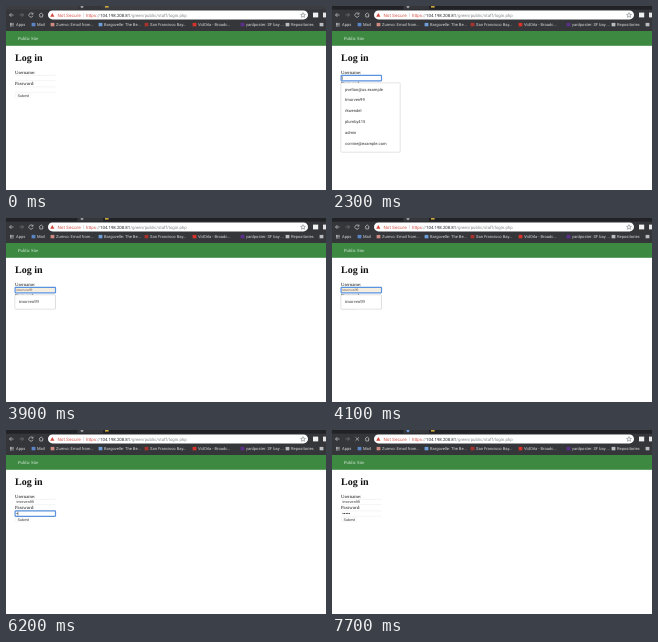
Recreate the animation shown at these times as an HTML page. Size 320x184 px, loop 8 s.

```html
<!DOCTYPE html>
<html lang="en">
<head>
<meta charset="utf-8">
<title>Log in</title>
<style>
  html, body { margin: 0; width: 100%; height: 100%; overflow: hidden; background: #fff; }
  svg { display: block; width: 100%; height: 100%; }
  text { text-rendering: geometricPrecision; white-space: pre; }
  .ui { font: 4.1px Roboto, sans-serif; }
  .form { font: 3.7px "Liberation Sans", sans-serif; fill: #333; }
  .serif { font-family: "Liberation Serif", serif; }
  .field { fill: none; stroke: #e4e4e4; stroke-width: .4; }
  .ring { fill: none; stroke: #5a92de; stroke-width: 1.2; }
  .caret { stroke: #333; stroke-width: .5; }
  .menu { fill: #fff; stroke: #d2d2d2; stroke-width: .4; filter: drop-shadow(0 .5px .6px #0004); }
  .icon { fill: none; stroke: #c6c8cb; stroke-width: .7; }
</style>
</head>
<body>
<svg id="stage" viewBox="0 0 320 184">
  <rect width="320" height="184" fill="#fff"/>

  <!-- browser chrome -->
  <rect width="320" height="25" fill="#35363a"/>
  <rect id="strip" width="320" height="3.6"/>
  <path d="M70 3.6Q71.5 3.6 71.5 2V0H97V2Q97 3.6 98.5 3.6Z" fill="#35363a"/>
  <circle id="spinner" cx="76" cy=".8" r="1.4"/>
  <rect x="99" width="3.6" height="1.6" fill="#cfa93c"/>
  <g class="icon">
    <path d="M7.5 9H3.5M5.4 7.1L3.5 9L5.4 10.9"/>
    <path d="M13.5 9H17.5M15.6 7.1L17.5 9L15.6 10.9" stroke="#77797d"/>
    <path id="reload" d="M26.7 7.8A2.1 2.1 0 1 0 27 9.7M27 6.6V8.2H25.4"/>
    <path id="stop" d="M23.6 7.3L27 10.7M27 7.3L23.6 10.7"/>
    <path d="M32.9 9L35.2 6.9L37.5 9M33.8 8.6V11H36.6V8.6"/>
  </g>
  <rect x="42" y="4.4" width="260" height="9" rx="4.5" fill="#fff"/>
  <path d="M46.3 7.1L48.4 10.7H44.2Z" fill="#d2483d"/>
  <text x="51.5" y="10.6" fill="#d2483d" style="font:4.4px Inter,sans-serif">Not Secure</text>
  <path d="M77.5 7V11" stroke="#c4c4c4" stroke-width=".5"/>
  <text class="ui" x="80" y="10.6" fill="#85878b" style="font-size:4.33px"><tspan fill="#d2483d">https</tspan>://<tspan fill="#2b2c30">104.198.208.81</tspan>/green/public/staff/login.php</text>
  <path d="M297 6.7L297.7 8.3L299.4 8.5L298.1 9.6L298.5 11.3L297 10.4L295.5 11.3L295.9 9.6L294.6 8.5L296.3 8.3Z" fill="none" stroke="#5f6368" stroke-width=".5"/>
  <rect x="307" y="6.6" width="5.2" height="4.8" fill="#f0f0f0"/>
  <rect x="317" y="6.6" width="3" height="4.8" fill="#e4e4e4"/>
  <g id="bookmarks" class="ui" fill="#d6d7da"></g>

  <!-- page -->
  <rect y="25" width="320" height="14.8" fill="#3d8942"/>
  <text class="serif" x="12" y="33.9" font-size="4.65" fill="#dcebdc">Public Site</text>
  <g class="serif" fill="#111" font-size="4.7">
    <text x="9" y="54.7" font-size="10" font-weight="bold">Log in</text>
    <text x="9" y="67.9">Username:</text>
    <text x="9" y="79.2">Password:</text>
  </g>
  <path class="field" d="M9 69.4H49.5M9 74.7H49.5M9 80.9H49.5M9 86.2H49.5"/>
  <rect x="9.5" y="87.4" width="15.5" height="4.4" rx=".8" fill="#fff" stroke="#eee" stroke-width=".4"/>
  <text class="form" x="11.6" y="90.9">Submit</text>

  <rect id="preview" x="9.7" y="69.9" width="39.2" height="4.3" fill="#f3eee0"/>
  <text id="user" class="form" x="10.4" y="73.4"></text>
  <text id="pass" class="form" x="10.2" y="85" style="font-size:4.6px"></text>
  <rect id="ring" class="ring" x="9.1" width="40.4" height="5.4" rx=".5"/>
  <path id="caret" class="caret" d="M0 0V4"/>

  <g id="fullMenu" class="ui" fill="#333">
    <rect class="menu" x="9" y="77" width="59" height="69" rx=".6"/>
  </g>
  <g id="oneMenu">
    <rect class="menu" x="9" y="77" width="40.4" height="14" rx=".6"/>
    <text id="match" x="13" y="84.6" fill="#333"></text>
  </g>
</svg>
<script>
const LOOP = 8000;
const NAME = "tmorven99";
const $ = id => document.getElementById(id);

function add(parent, tag, attrs, text = "") {
  const node = document.createElementNS("http://www.w3.org/2000/svg", tag);
  for (const key in attrs) node.setAttribute(key, attrs[key]);
  node.textContent = text;
  parent.append(node);
}

const bookmarks = [
  [10, "Apps", ""],
  [31, "Mail", "#5a86c8"],
  [50, "Zumvo: Email from...", "#d08a84"],
  [98, "Bargovelle: The Be...", "#6f9fd8"],
  [144, "San Francisco Bay...", "#a8322c"],
  [192, "VidOrla - Broadc...", "#d8342c"],
  [240, "yardposter: SF bay ...", "#5b2f8a"],
  [285, "Repositories", "#b9bcc0"],
  [319, "", "#b9bcc0"]
];
for (const [x, label, color] of bookmarks) {
  if (color) add($("bookmarks"), "rect", { x: x - 5.4, y: 16.9, width: 3.8, height: 3.4, fill: color });
  add($("bookmarks"), "text", { x, y: 20 }, label);
}
for (let i = 0; i < 9; i++) {
  add($("bookmarks"), "rect", { x: 4 + i % 3 * 1.3, y: 16.9 + Math.floor(i / 3) * 1.3, width: .9, height: .9 });
}

["pvelton@us.example", NAME, "rkwendel", "plumby415", "admin", "corvine@example.com"]
  .forEach((label, i) => add($("fullMenu"), "text", { x: 13, y: 84.5 + i * 10.95 }, label));
$("match").textContent = NAME;

const show = (id, on) => $(id).style.display = on ? "" : "none";
const within = (t, from, to) => t >= from && t < to;

function draw(t) {
  const onUser = within(t, 2300, 4400);
  const onPass = within(t, 5200, 7600);
  const previewing = within(t, 3900, 4400);
  const loading = t >= 7600;
  const dots = [6200, 6300, 6500, 6500, 6600].filter(at => t >= at).length;

  $("strip").setAttribute("fill", t < 1400 ? "#3b3d41" : "#212226");
  $("spinner").setAttribute("fill", loading ? "#6f9be0" : "#9a9ca0");
  show("reload", !loading);
  show("stop", loading);

  $("user").textContent = t >= 3900 ? NAME : t >= 3500 ? NAME[0] : "";
  $("user").style.fontFamily = previewing ? '"Liberation Serif", serif' : "";
  $("user").style.fill = previewing ? "#6b4a40" : "";
  $("pass").textContent = "•".repeat(dots);
  show("preview", previewing);

  show("ring", onUser || onPass);
  $("ring").setAttribute("y", onUser ? 69.4 : 80.9);

  // the caret blinks every half second and stays on while typing
  const blink = within(t, 2300, 2800) || within(t, 3300, 3900)
    || within(t, 5200, 5700) || within(t, 6200, 7100);
  const caretX = onUser ? (t >= 3500 ? 11.6 : 10.3) : 10.3 + dots * 1.61;
  show("caret", blink);
  $("caret").setAttribute("transform", `translate(${caretX} ${onUser ? 70.1 : 81.6})`);

  show("fullMenu", within(t, 2300, 3500));
  show("oneMenu", within(t, 3500, 4400));
  $("match").setAttribute("class", previewing ? "serif" : "ui");
  $("match").style.fontSize = previewing ? "4.6px" : "";
}

const start = performance.now();
function tick() {
  draw((performance.now() - start) % LOOP);
  requestAnimationFrame(tick);
}
tick();
</script>
</body>
</html>
```
